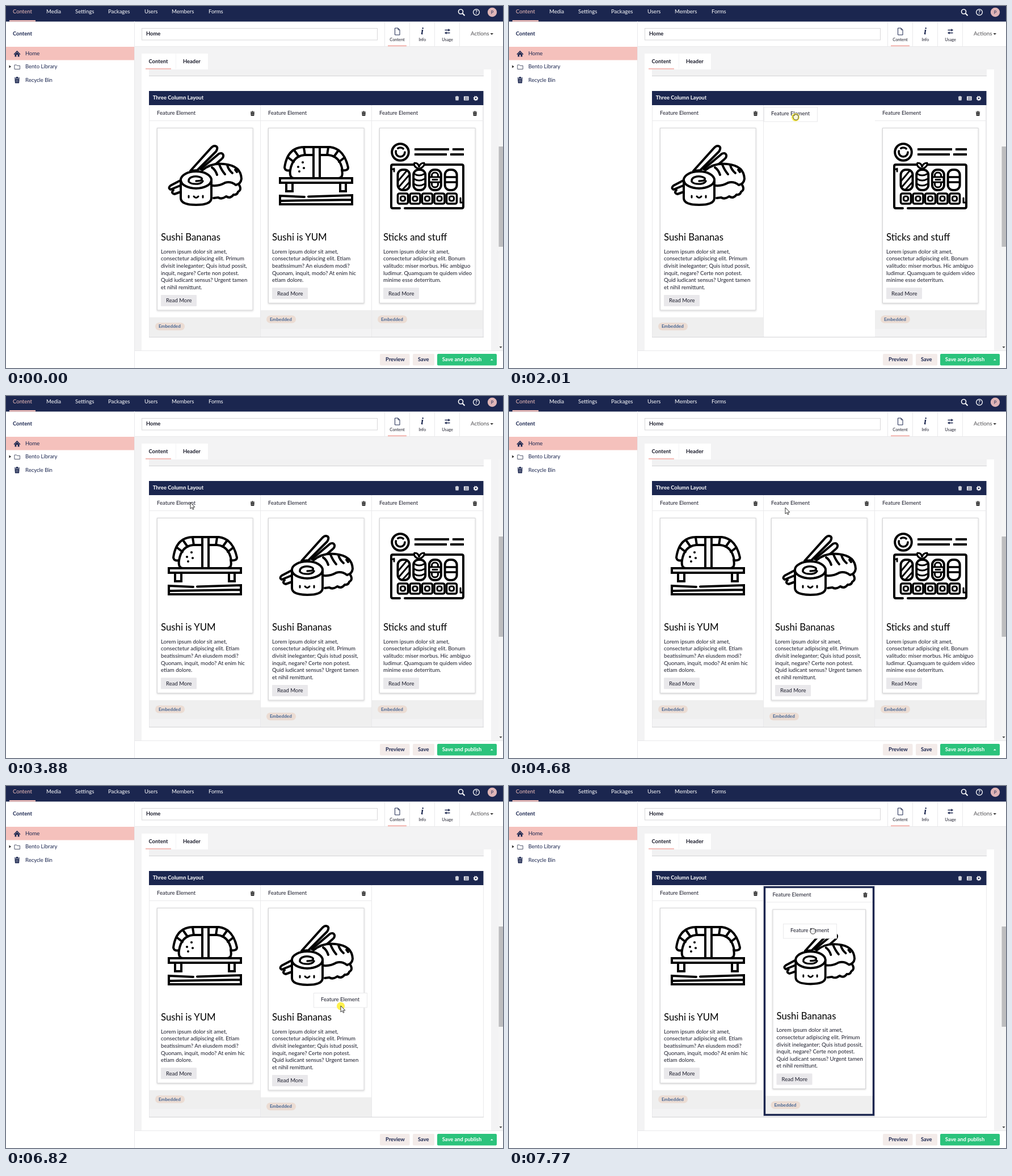
Recreate the animation shown at these times as an HTML page. Size 876 by 639 pixels, loop 8000 ms.

```html
<!DOCTYPE html>
<html lang="en">
<head>
<meta charset="utf-8">
<title>Block layout editor</title>
<style>
  html, body { margin: 0; width: 100%; height: 100%; overflow: hidden; background: #fff; }
  svg { display: block; }
  text { font: 9.5px Lato, sans-serif; fill: #1b1c2b; white-space: pre; }
  .bold { font-weight: 700; font-size: 9.4px; }
  .light { fill: #fff; }
  .navy { fill: #1b264f; }
  .title { font-size: 16.8px; fill: #000; }
  .body { font-size: 9.65px; }
  .small { font-size: 7.4px; }
  .pill { font-size: 8.2px; font-weight: 700; fill: #456594; }
  .art { fill: none; stroke: #000; stroke-width: 4; stroke-linecap: round; stroke-linejoin: round; }
  .art .paper { fill: #fff; }
  .art .dot { fill: #000; stroke: none; }
</style>
</head>
<body>
<svg id="stage" width="876" height="639" viewBox="0 0 876 639"></svg>
<script>
const NAVY = '#1b264f', PINK = '#f5c1bc', LINE = '#e9e9eb', GREY = '#f3f3f4';
const LOOP = 8000, STEP = 78, COLUMN_X = [253, 449, 645];

const rect = (x, y, w, h, fill, extra = '') =>
  `<rect x="${x}" y="${y}" width="${w}" height="${h}" fill="${fill}" ${extra}/>`;
const text = (x, y, label, cls = '', extra = '') =>
  `<text x="${x}" y="${y}" class="${cls}" ${extra}>${label}</text>`;
const path = (d, extra = '') => `<path d="${d}" ${extra}/>`;
const line = (d, color, width) => path(d, `fill="none" stroke="${color}" stroke-width="${width}"`);
const circle = (x, y, r, extra = '') => `<circle cx="${x}" cy="${y}" r="${r}" ${extra}/>`;
const group = (x, y, inner, scale = 1) => `<g transform="translate(${x} ${y}) scale(${scale})">${inner}</g>`;
const repeat = (n, draw) => Array.from({ length: n }, (_, i) => draw(i)).join('');

const trash = (x, y, color, scale = 1) => group(x, y,
  path('M-3.2-2H3.2L2.7 4H-2.7Z', `fill="${color}"`) +
  line('M-3.6-3H3.6M-1.2-4H1.2', color, 1.1) +
  line('M-1-.8V3M1-.8V3', color === '#fff' ? NAVY : '#fff', .5), scale);

// Illustrations share the coordinates of the first column.
const art = {
  maki:
    path('M325 291 361 251Q366 245 371 248 374 251 370 257L337 290Z', 'class="paper"') +
    path('M343 288 375 261Q381 258 383 263 384 267 379 271L357 290Z', 'class="paper"') +
    path('M309 307 290 317Q285 321 290 324L307 317M295 325Q290 330 297 332L308 328') +
    path('M346 290Q362 276 385 279 414 282 415 305 414 314 405 316 396 309 386 312 376 318 364 317', 'class="paper"') +
    path('M363 285Q369 289 372 298M376 280Q380 290 386 297M390 281Q392 289 399 295M404 289 407 293') +
    path('M411 316Q416 324 409 328 407 334 401 333 395 341 388 336 380 342 374 338L366 339') +
    path('M308 307V339Q308 351 335 351 362 351 362 339V307', 'class="paper"') +
    '<ellipse cx="335" cy="307" rx="27" ry="15" class="paper"/>' +
    path('M335 309Q347 309 345 304 340 300 331 301 321 303 322 310 326 315 338 314 345 313 347 309', 'stroke-width="3.4"') +
    path('M322 335V338M347 335V338M331 336Q335 341 339 336', 'stroke-width="3"'),
  bench:
    path('M305 289Q303 304 312 304H390Q399 304 396 289') +
    path('M295 285Q300 249 330 249H375Q400 252 407 285 407 291 397 290 393 265 372 263H330Q309 265 305 290 296 292 295 285Z', 'class="paper"') +
    path('M302 268 311 275M313 256 320 266M329 250 331 263M372 250 370 263M389 256 382 266M400 268 391 275') +
    rect(346, 249, 11, 55, '#fff') + path('M346 249V304M357 249V275M357 283V304') +
    circle(327, 276, 2.1, 'class="dot"') + circle(319, 284, 2.1, 'class="dot"') +
    circle(329, 286, 2.1, 'class="dot"') + circle(321, 292, 2, 'class="dot"') +
    '<g stroke-linejoin="miter">' +
    path('M298 312H309V327H298ZM393 312H403V327H393Z') +
    path('M287 304H414V312H287Z', 'class="paper"') +
    path('M330 337 287 335V350H414V334L337 336.5M287 344 414 342') + '</g>',
  tray:
    circle(303, 258, 14.8) + circle(303, 258, 8, 'stroke-width="3.6" stroke-dasharray="27 6 10 8"') +
    '<g stroke-linecap="butt">' +
    path('M328 253H389M395 253H415M328 262H385M391 262H415') + '</g>' +
    path('M302 357H290Q287 357 287 354V283Q287 280 290 280H326M346 280H411Q414 280 414 283V354Q414 357 411 357H311') +
    path('M292 287V292M288 288H292M409 339V347M413 347H409', 'stroke-width="3"') +
    repeat(4, i => rect(298.5 + 27.7 * i, 289, 21, 36, '#fff', 'rx="9"')) +
    path('M299 309 315 290M300 320 318 299M307 324 319 311', 'stroke-width="3"') +
    path('M336 288Q325 283 328 277 335 277 336 284 338 277 345 277 347 283 336 288', 'class="paper" stroke-width="3.2"') +
    path('M327 296Q336 302 346 296M327 305Q336 311 346 305M327 314Q336 320 346 314', 'stroke-width="3"') +
    rect(358.5, 294, 11, 26, '#fff', 'rx="5" stroke-width="3"') +
    rect(354, 302, 20, 9, '#fff', 'stroke-width="3"') + path('M360 306.5H368', 'stroke-width="3"') +
    path('M382 302H402M382 311H402', 'stroke-width="3.4"') +
    repeat(5, i => rect(298.5 + 21.5 * i, 331, 18, 18, '#fff', 'rx="3" stroke-width="3.6"') +
      rect(303.5 + 21.5 * i, 336, 8, 8, '#fff', 'rx="3" stroke-width="3.2"'))
};

const cards = {
  maki: { title: 'Sushi Bananas', lines: ['Lorem ipsum dolor sit amet,', 'consectetur adipiscing elit. Primum',
    'divisit ineleganter; Quis istud possit,', 'inquit, negare? Certe non potest.',
    'Quid iudicant sensus? Urgent tamen', 'et nihil remittunt.'] },
  bench: { title: 'Sushi is YUM', lines: ['Lorem ipsum dolor sit amet,', 'consectetur adipiscing elit. Etiam',
    'beatissimum? An eiusdem modi?', 'Quonam, inquit, modo? At enim hic', 'etiam dolore.'] },
  tray: { title: 'Sticks and stuff', lines: ['Lorem ipsum dolor sit amet,', 'consectetur adipiscing elit. Bonum',
    'valitudo: miser morbus. Hic ambiguo', 'ludimur. Quamquam te quidem video', 'minime esse deterritum.'] }
};

function column(index, kind, selected, hovered) {
  if (!kind) return rect(COLUMN_X[index], 175, 195.5, 409, '#fff');
  const { title, lines } = cards[kind];
  const inset = selected ? 2.5 : 0;
  const bottom = 461.3 + 12.6 * lines.length;
  const strip = bottom + 12.7 - inset;
  const copy = text(273, 414, title, 'title') +
    lines.map((words, i) => text(273, 436.8 + 12.6 * i, words, 'body')).join('') +
    rect(273, bottom - 27, 63, 20, '#e9e8eb', 'rx="1"') + text(282, bottom - 13.6, 'Read More') +
    rect(263, bottom + 22, 52, 13.5, '#ebdcd3', 'rx="6.7"') + text(269, bottom + 31.4, 'Embedded', 'pill');
  return group(COLUMN_X[index] - 253, 0,
    rect(253, 175, 195, 409, GREY) + rect(253, 175, 195, strip - 175, '#fff') +
    rect(253, strip, 195, 33, hovered ? '#f5c5c0' : '#efefef') +
    line(`M253 ${202.5 + inset}H448M448.5 175V584`, LINE, 1) +
    text(266 + inset, 192.4 + inset, 'Feature Element') + trash(434.5 - inset, 190 + inset, '#222') +
    rect(266.5 + inset, 215.5 + inset, 168.5 - 2 * inset, bottom - 215.5 - 2 * inset, '#fff',
      'stroke="#d4d4d6" filter="url(#shadow)"') +
    group(350.5, 299.5, `<g class="art" transform="translate(-350.5 -299.5)">${art[kind]}</g>`, selected ? .97 : 1) +
    group(inset, -inset, copy) +
    (selected ? rect(254.5, 178.5, 192, 402, 'none', `stroke="${NAVY}" stroke-width="3.4"`) : ''));
}

function chrome() {
  const menu = [[12, 'Content'], [71, 'Media'], [122, 'Settings'], [180, 'Packages'], [244, 'Users'], [292, 'Members'], [357, 'Forms']];
  const topBar = rect(0, 0, 876, 27.5, NAVY) + rect(6, 25, 46, 2.5, PINK) +
    menu.map(([x, label], i) => text(x, 13.4, label, i ? 'light' : '', i ? '' : `style="fill:${PINK}"`)).join('') +
    circle(801.5, 10, 4, 'fill="none" stroke="#fff" stroke-width="1.6"') + line('M804.5 13 808.5 17', '#fff', 2) +
    circle(829, 11, 5.4, 'fill="none" stroke="#fff" stroke-width="1.3"') +
    text(829, 14.3, '?', 'light bold', 'text-anchor="middle"') +
    circle(857, 11, 8.2, 'fill="#dfb5b7"') + text(857, 13.6, 'P', 'small navy', 'text-anchor="middle"');
  const tree = line('M226.5 27V639', LINE, 1) + text(12, 52.3, 'Content', 'bold navy') + rect(0, 72, 226, 23.5, PINK) +
    path('M13.5 85 19.5 78.8 25.5 85 24.5 86 19.5 81 14.5 86ZM15.5 85.6 19.5 81.8 23.5 85.6V89.5H20.7V86H18.3V89.5H15.5Z', `fill="${NAVY}"`) +
    text(34, 87.3, 'Home', 'navy') + path('M5.5 104.5 9 107 5.5 109.5Z', 'fill="#222"') +
    path('M15 104H18.5L19.5 105.3H24.5V111.5H15Z', 'fill="none" stroke="#555b70"') + text(34, 110.4, 'Bento Library', 'navy') +
    trash(19.5, 131, NAVY, 1.3) + text(34, 133.8, 'Recycle Bin', 'navy');
  const header = rect(239.5, 39.5, 415, 20.5, '#fff', 'stroke="#d8d7d9"') + text(247, 52.4, 'Home', 'bold') +
    line('M667.5 28V71M711.5 28V71M755.5 28V71M799.5 28V71M227 71.5H876', LINE, 1) + rect(673, 69, 33, 2.5, PINK) +
    path('M685.5 39H691L694 42V51H685.5ZM691 39V42H694', `fill="none" stroke="${NAVY}"`) +
    text(733.5, 50, 'i', 'navy', 'text-anchor="middle" style="font:italic bold 17px Liberation Serif,serif"') +
    line('M773.5 42.5H780M776 47.5H782.5', NAVY, 1.3) +
    path('M779.5 40 783 42.5 779.5 45ZM776.5 45 773 47.5 776.5 50Z', `fill="${NAVY}"`) +
    ['Content', 'Info', 'Usage'].map((label, i) => text(689.5 + 44.3 * i, 61.5, label, 'small', 'text-anchor="middle"')).join('') +
    text(819, 52.3, 'Actions', '', 'style="font-size:9.8px;fill:#515054"') + path('M853.5 48H859L856.2 51Z', 'fill="#333"');
  const workspace = rect(227, 72, 649, 536, GREY) + rect(239, 112, 616, 496, '#fff') + rect(239, 84, 117, 28, '#fff') +
    line('M299.5 84V111', GREY, 1) + text(251.5, 101, 'Content', 'bold') + text(312, 101, 'Header', 'bold') +
    rect(246, 109.7, 45, 2.3, PINK) + rect(252, 112, 590, 11, '#f1f1f2') + line('M252 123.5H842', '#d3d3d5', 1) +
    rect(868, 112, 8, 496, '#f5f5f5') + rect(868.5, 248, 7.5, 177, '#bdbdbf') + path('M869.5 601H874.5L872 604Z', 'fill="#444"') +
    rect(252, 150, 589.5, 25, NAVY) + text(258.7, 165.2, 'Three Column Layout', 'bold light') + trash(795, 163, '#fff', .9) +
    rect(807, 159.5, 8.5, 7, '#fff') + line('M808 162H814.5M808 164.5H814.5M810 160V166M812.7 160V166', NAVY, .6) +
    circle(828, 163, 2.4, 'fill="none" stroke="#fff" stroke-width="1.9"') +
    circle(828, 163, 3.7, 'fill="none" stroke="#fff" stroke-width="1.2" stroke-dasharray="1.5 1.4"');
  const footer = rect(227, 608, 649, 31, '#fff') + line('M227 608.5H876', LINE, 1) +
    rect(659, 614, 52.5, 20.5, '#f3ebe9', 'rx="2"') + text(669, 627.3, 'Preview', 'bold navy') +
    rect(717, 614, 38, 20.5, '#f3ebe9', 'rx="2"') + text(726, 627.3, 'Save', 'bold navy') +
    rect(760, 614, 105, 20.5, '#2bc37c', 'rx="2"') + text(768.7, 627.3, 'Save and publish', 'bold light') +
    path('M853.8 625.5H858.6L856.2 623Z', 'fill="#fff"');
  return topBar + tree + header + workspace + footer;
}

const pointers = {
  arrow: path('M0 0V11L2.6 8.7 4.3 12.4 6 11.6 4.3 8.1H7.8Z', 'fill="#fff" stroke="#222" stroke-width=".9"'),
  hand: path('M-4.5-.5Q-4-3-2-2.5V-4Q-.5-5.5.5-4 2-5.3 3-3.5 5-4 5 -2V1.5Q4.5 4.5 2.5 5H-1.5Q-3.5 3.5-4.5-.5Z',
    'fill="#fff" fill-opacity=".75" stroke="#222" stroke-width=".9"'),
  zoom: circle(0, 0, 3.6, 'fill="#fff" stroke="#222" stroke-width="1"') +
    line('M-2 0H2M0-2V2', '#222', .9) + line('M2.7 2.7 6.5 6.5', '#222', 1.7)
};

// [time, x, y] with linear travel between entries.
const pointerTrack = [
  [530, 712, 330], [690, 508, 289], [1160, 504, 204], [1310, 501, 199], [1390, 500, 178], [1540, 500, 182],
  [1620, 500, 188], [1860, 505, 196], [2010, 505, 196], [2790, 340, 232], [3500, 340, 232], [3880, 325, 188],
  [4030, 305, 218], [4190, 295, 208], [4350, 290, 190], [4680, 487, 197], [4910, 672, 190], [5150, 458, 190],
  [5310, 357, 190], [5550, 357, 190], [6210, 695, 198], [6420, 697, 196], [6820, 590, 388], [7210, 529, 311],
  [7450, 535, 256]];
const labelTracks = [
  [[2010, 449, 178], [2790, 283, 215], [3410, 283, 215]],
  [[6420, 645, 178], [6820, 542, 365], [7210, 477, 298], [7450, 483, 243], [LOOP, 483, 243]]];
const pointerKinds = [[530, 'zoom'], [1160, 'arrow'], [1860, 'hand'], [3880, 'arrow'], [3960, 'zoom'],
  [4190, 'arrow'], [6420, 'hand'], [6580, 'arrow'], [7050, 'hand']];

function along(track, t) {
  const next = track.findIndex(key => key[0] > t);
  if (next < 0) return track.at(-1).slice(1);
  const [a, b] = [track[next - 1], track[next]];
  const u = Math.floor((t - a[0]) / STEP) * STEP / (b[0] - a[0]);
  return [a[1] + (b[1] - a[1]) * u, a[2] + (b[2] - a[2]) * u];
}
const within = (t, from, to) => t >= from && t < to;

function layout(t) {
  const order = t < 3410 ? ['maki', 'bench', 'tray'] : ['bench', 'maki', 'tray'];
  if (within(t, 2010, 3410)) order[1] = null;
  if (t >= 6420) order[2] = null;
  const selected = within(t, 2400, 3410) ? 0 : t >= 7050 ? 1 : -1;
  const hovered = within(t, 610, 1090) ? 1 : within(t, 3960, 4190) ? 0 : -1;
  return order.map((kind, i) => column(i, kind, i === selected, i === hovered)).join('') +
    line('M252.5 175V584M841.5 175V584', LINE, 1) + line('M252 584.5H842', '#d3d3d5', 1);
}

function overlay(t) {
  if (t < 530) return '';
  const track = labelTracks.find(keys => within(t, keys[0][0], keys.at(-1)[0]));
  const label = track ? group(...along(track, t),
    rect(.5, .5, 94, 25.5, '#fff', `stroke="${LINE}"`) + text(13, 15.4, 'Feature Element')) : '';
  const pressed = within(t, 1860, 3130) || within(t, 6420, 7450);
  const kind = pointerKinds.findLast(([start]) => t >= start)[1];
  return label + group(...along(pointerTrack, t),
    (pressed ? circle(0, .5, 7, 'fill="#ffee2e" fill-opacity=".85"') : '') + pointers[kind]);
}

const stage = document.getElementById('stage');
stage.innerHTML = '<defs><filter id="shadow" x="-10%" y="-10%" width="120%" height="120%">' +
  '<feDropShadow dx="0" dy="1" stdDeviation="1.8" flood-color="#000" flood-opacity=".18"/></filter></defs>' +
  chrome() + '<g id="columns"></g><g id="overlay"></g>';

const layers = { columns: layout, overlay };
const shown = {};
function frame(now) {
  for (const id in layers) {
    const markup = layers[id](now % LOOP);
    if (markup !== shown[id]) document.getElementById(id).innerHTML = shown[id] = markup;
  }
  requestAnimationFrame(frame);
}
frame(performance.now());
</script>
</body>
</html>
```
